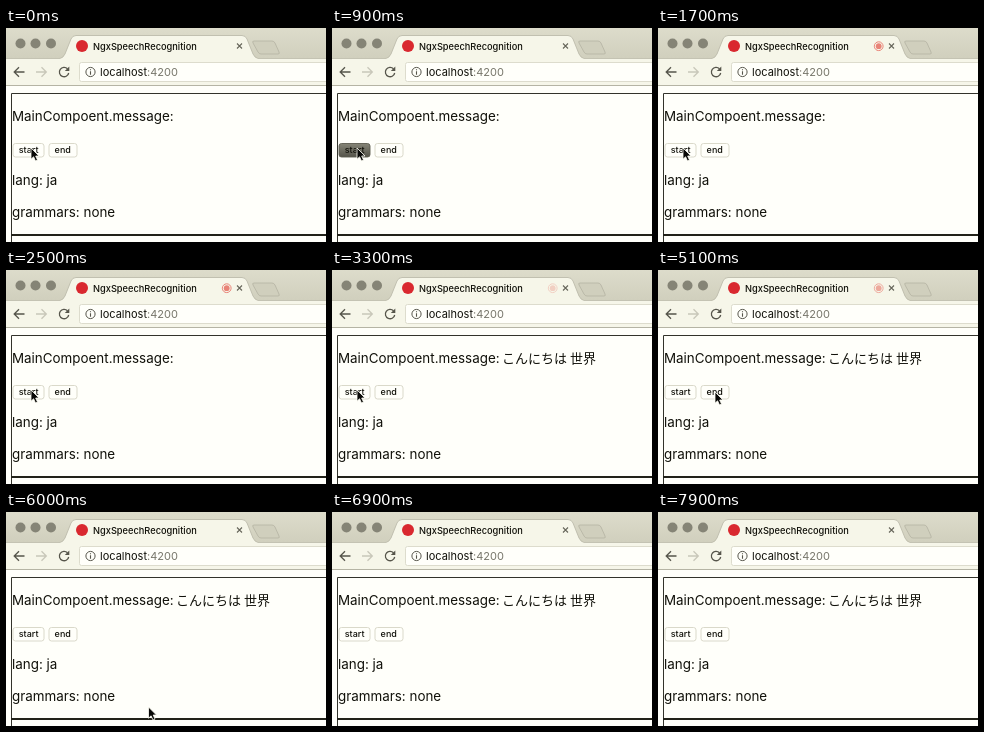
Write an HTML page that moves like this. It is 320 px wide and 214 px high and loops after 8000 ms.

```html
<!DOCTYPE html>
<html lang="ja">
<head>
<meta charset="utf-8">
<style>
  html, body { margin: 0; width: 100%; height: 100%; overflow: hidden; background: #fffffa; }
  svg { display: block; width: 100vw; height: 100vh; }
  text { white-space: pre; fill: #11110a; font-family: Inter, "Liberation Sans", sans-serif; }
  .title { font-size: 9.25px; font-weight: 500; }
  .address { font-size: 11px; }
  .page { font-size: 13.4px; }
  .ja { font: 500 13px "Noto Sans CJK JP", "Noto Sans CJK", sans-serif; }
  .label { font-size: 9px; font-weight: 500; }
</style>
</head>
<body>
<svg viewBox="0 0 320 214">
  <defs>
    <linearGradient id="strip" x2="0" y2="1">
      <stop stop-color="#dddccb"/><stop offset="1" stop-color="#d0cfbd"/>
    </linearGradient>
    <linearGradient id="pressed" x2="0" y2="1">
      <stop stop-color="#858476"/><stop offset="1" stop-color="#55544a"/>
    </linearGradient>
  </defs>

  <rect width="320" height="214" fill="#fffffa"/>
  <rect width="320" height="31" fill="url(#strip)"/>
  <g fill="#858476">
    <circle cx="14.500" cy="15.500" r="5"/><circle cx="29.500" cy="15.500" r="5"/><circle cx="45" cy="15.500" r="5"/>
  </g>
  <path d="M248 13H266Q268 13 269 15L273 24Q274 26 272 26H255Q253 26 252 24L247 15Q246 13 248 13Z" fill="#d0cfbd" stroke="#b4b3a2" stroke-width=".8"/>
  <rect y="30" width="320" height="28" fill="#f6f6e9"/>
  <path d="M0 30.500H54Q57 30 59 26L65 11Q66.500 7.500 70 7.500H236Q239.500 7.500 241 11L247 26Q249 30 252 30.500H320" fill="#f6f6e9" stroke="#b8b7a6" stroke-width=".8"/>
  <rect x="56" y="30" width="194" height="2" fill="#f6f6e9"/>

  <circle cx="76" cy="18" r="6" fill="#d9282f"/>
  <text class="title" x="87" y="21.500">NgxSpeechRecognition</text>
  <g id="recording" fill="none" stroke="#e0382c">
    <circle cx="220.700" cy="18.200" r="4.400"/>
    <circle cx="220.700" cy="18.200" r="2.900" fill="#e0382c" stroke="none"/>
  </g>
  <path d="M231 15.500L236 20.500M236 15.500L231 20.500" stroke="#66655a" stroke-width="1.100"/>

  <g fill="none" stroke="#56554b" stroke-width="1.300">
    <path d="M18.500 44H8.500M13 39.200L8.200 44L13 48.800"/>
    <path d="M30 44H40M35.500 39.200L40.300 44L35.500 48.800" stroke="#c8c7b9"/>
    <path d="M61.500 40.800A4.700 4.700 0 1 0 62.700 45"/>
    <path d="M63.300 38.500V43H58.800Z" fill="#56554b" stroke="none"/>
  </g>
  <rect x="73.500" y="34.500" width="252" height="19" rx="2" fill="#fffffa" stroke="#dddccd"/>
  <circle cx="84.500" cy="44" r="4.600" fill="none" stroke="#56554b"/>
  <path d="M84.500 43.200V46.800M84.500 41.200V42.300" stroke="#56554b" stroke-width="1.100"/>
  <text class="address" x="94" y="48">localhost<tspan fill="#77766a">:4200</tspan></text>
  <path d="M0 57.500H320" stroke="#b5b4a4"/>

  <path d="M320 65.500H5.500V214" fill="none" stroke="#33332b"/>
  <path d="M5 207H320" stroke="#222219" stroke-width="2"/>

  <g class="page">
    <text x="6" y="93">MainCompoent.message:</text>
    <text x="6" y="157">lang: ja</text>
    <text x="6" y="189">grammars: none</text>
  </g>
  <text id="message" class="ja" x="170" y="92.800">こんにちは 世界</text>

  <g class="label" stroke-width=".9">
    <rect id="start" x="7" y="115.500" width="31" height="13.500" rx="2.500"/>
    <text x="12.700" y="125.300">start</text>
    <rect id="end" x="43" y="115.500" width="28" height="13.500" rx="2.500"/>
    <text x="48.600" y="125.300">end</text>
  </g>

  <path id="cursor" d="M0 0V11.200L2.600 8.800L4.500 13L6.500 12.100L4.700 8H8Z" fill="#080806" stroke="#fffff6" stroke-width=".8"/>
</svg>
<script>
  const LOOP = 8000;
  const el = id => document.getElementById(id);
  const smooth = u => u * u * (3 - 2 * u);
  const linear = u => u;

  // Keys are [time, ...values]; values hold outside the key range.
  function track(keys, t, ease) {
    const next = keys.findIndex(key => key[0] > t);
    if (next === 0) return keys[0].slice(1);
    if (next < 0) return keys[keys.length - 1].slice(1);
    const [a, b] = [keys[next - 1], keys[next]];
    const u = ease((t - a[0]) / (b[0] - a[0]));
    return a.slice(1).map((v, i) => v + (b[i + 1] - v) * u);
  }

  const cursorPath = [
    [4200, 25, 120], [4600, 57, 122], [5500, 57, 122],
    [5950, 142.5, 195], [6350, 142.5, 195], [6750, 165, 217]
  ];
  const recordingGlow = [
    [1100, 0], [2100, 1], [3100, 0], [4100, 1], [5100, .4], [5500, 0]
  ];

  function paintButton(id, down) {
    el(id).setAttribute('fill', down ? 'url(#pressed)' : '#fffffa');
    el(id).setAttribute('stroke', down ? '#5d5c50' : '#d6d5c6');
  }

  function render(t) {
    const [x, y] = track(cursorPath, t, smooth);
    el('cursor').setAttribute('transform', `translate(${x} ${y})`);
    el('recording').setAttribute('opacity', track(recordingGlow, t, linear)[0]);
    el('message').setAttribute('visibility', t >= 3300 ? 'visible' : 'hidden');
    paintButton('start', t >= 900 && t < 1000);
    paintButton('end', t >= 4700 && t < 4800);
  }

  const begin = performance.now();
  function tick() {
    render((performance.now() - begin) % LOOP);
    requestAnimationFrame(tick);
  }
  tick();
</script>
</body>
</html>
```
